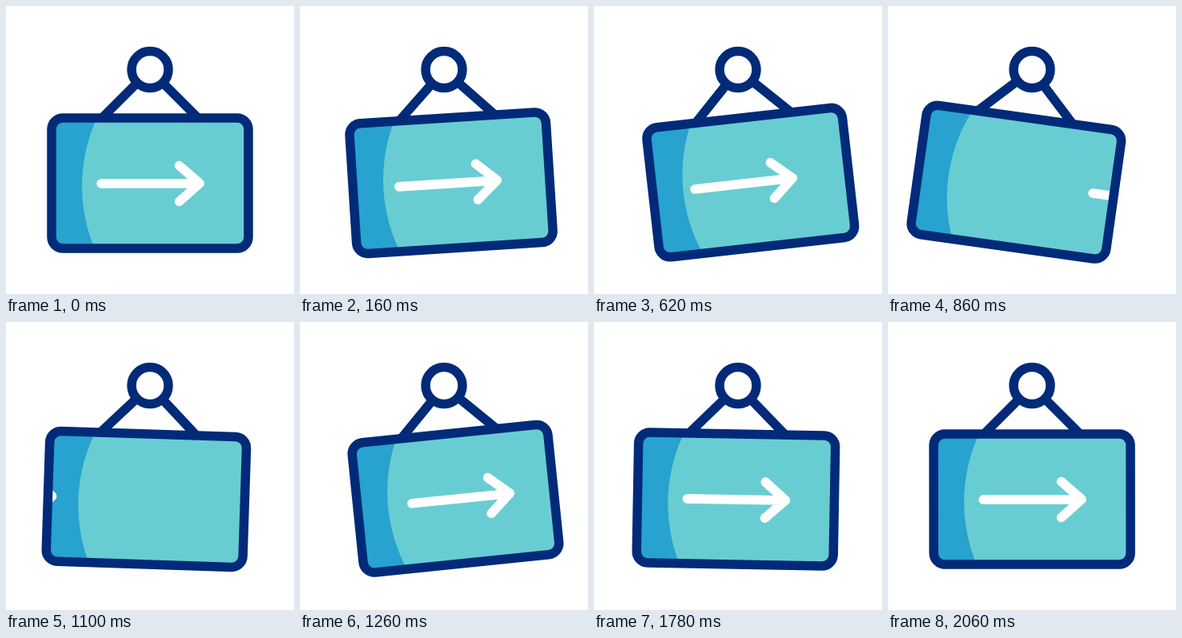
Animation, 360 px wide and 360 px high, one loop 3.02 s. Source, as an HTML page:

```html
<!DOCTYPE html>
<html lang="en">
<head>
<meta charset="utf-8">
<title>Swinging sign</title>
<style>
  html, body { margin: 0; width: 100%; height: 100%; overflow: hidden; background: #fff; }
  svg { display: block; width: 100vw; height: 100vh; }
</style>
</head>
<body>
<svg viewBox="0 0 360 360">
  <defs>
    <clipPath id="board"><rect x="57" y="140" width="246" height="163" rx="14"/></clipPath>
  </defs>
  <g id="sign" fill="none" stroke="#012a78" stroke-width="11.5">
    <path d="M164 96 119 141M196 96 241 141"/>
    <g clip-path="url(#board)" stroke="none">
      <rect x="51" y="134" width="258" height="175" fill="#28a2ce"/>
      <circle cx="298" cy="225" r="203" fill="#68cdd2"/>
      <path id="arrow" d="M119 222H241M216.5 199.5 242 221.7 216.5 244.5" stroke="#fff"
        stroke-width="11.6" stroke-linecap="round" stroke-linejoin="round"/>
    </g>
    <rect x="57" y="140" width="246" height="163" rx="14"/>
  </g>
  <circle cx="180" cy="79.5" r="23" fill="#fff" stroke="#012a78" stroke-width="11.5"/>
  <path id="glint" fill="#cfdcf3" d="M166 72Q169 62 180 62T191 72L188 80Q181 90 174 80Q167 79 166 72Z"/>
</svg>
<script>
  const LOOP = 3020;
  const [sign, arrow, glint] = ['sign', 'arrow', 'glint'].map(id => document.getElementById(id));

  // Cubic ease in and out, from 0 at start to 1 at end.
  function progress(time, start, end) {
    const t = Math.min(1, Math.max(0, (time - start) / (end - start)));
    return t < 0.5 ? 4 * t ** 3 : 1 - 4 * (1 - t) ** 3;
  }

  // Angles where the sign turns back; each swing is 80 ms shorter than the one before.
  const TURNS = [-14, 8, -6, 2.4, -1, 0];
  const turnTime = n => n < 0 ? 0 : 400 + n * (540 - 40 * n);

  function swing(time) {
    return TURNS.reduce((angle, turn, n) =>
      angle + (turn - (TURNS[n - 1] ?? 0)) * progress(time, turnTime(n - 1), turnTime(n)), 0);
  }

  // Wind up, leave on the right, come back from the left past the middle, settle.
  function slide(time) {
    const windUp = 20, travel = 210, wrap = time < 1030 ? 0 : -380;
    return wrap
      - windUp * (progress(time, 0, 420) + progress(time, 1340, 1700))
      + travel * (progress(time, 490, 1050) + progress(time, 1030, 1340));
  }

  function draw(time) {
    sign.setAttribute('transform', `rotate(${swing(time)} 180 79.5)`);
    arrow.setAttribute('transform', `translate(${slide(time)} 0)`);
    glint.style.display = time >= 320 && time < 380 ? '' : 'none';
  }

  const begin = performance.now();
  function tick() {
    draw((performance.now() - begin) % LOOP);
    requestAnimationFrame(tick);
  }
  tick();
</script>
</body>
</html>
```
